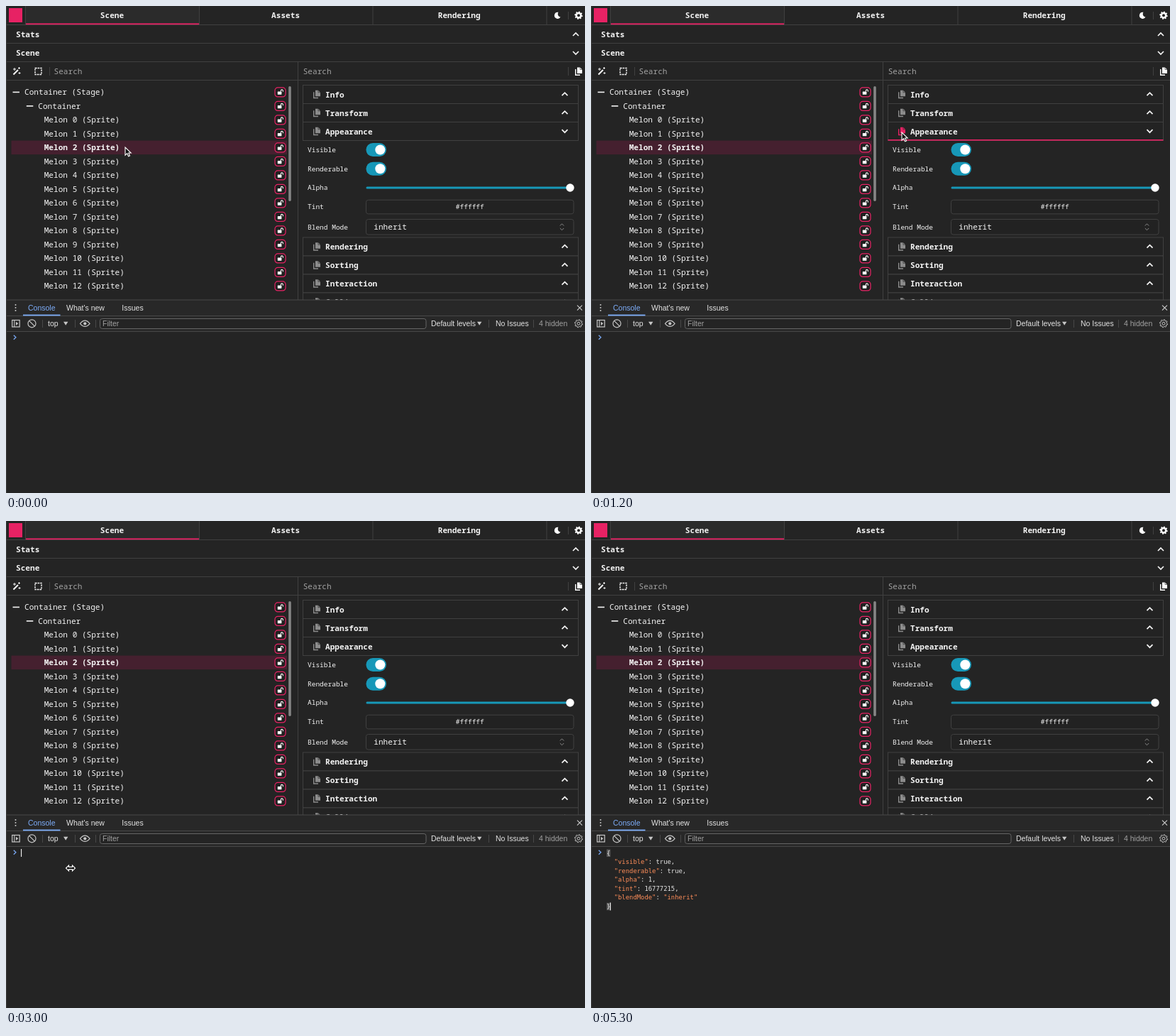
An HTML page that plays this animation: 816 px wide and 686 px high, repeating every 5.4 s.

```html
<!DOCTYPE html>
<html lang="en">
<head>
<meta charset="utf-8">
<title>Scene inspector</title>
<style>
html, body { margin: 0; width: 100%; height: 100%; overflow: hidden; background: #242424; }
svg { display: block; width: 816px; height: 686px; }
text { white-space: pre; fill: #f4f4f4; }
.mono { font: 11.1px "Noto Sans Mono", "DejaVu Sans Mono", monospace; }
.bold { font-weight: 700; }
.small { font-size: 9.5px; }
.ui { font: 10.5px "Liberation Sans", Arial, sans-serif; fill: #e3e3e3; }
.code { font: 8.88px "DejaVu Sans Mono", monospace; fill: #e6e6e6; }
.dim { fill: #a0a0a0; }
.mid { text-anchor: middle; }
</style>
</head>
<body>
<svg id="stage" viewBox="0 0 816 686" xmlns="http://www.w3.org/2000/svg"></svg>
<script>
const PINK = '#e72264', TEAL = '#1798b8', BLUE = '#7cacf8', LINE = '#404040';
const LOOP = 5400, STEP = 100;
const stage = document.getElementById('stage');

const rect = (x, y, w, h, fill, extra = '') =>
  `<rect x="${x}" y="${y}" width="${w}" height="${h}" fill="${fill}" ${extra}/>`;
const path = (d, stroke, width = 1, extra = '') =>
  `<path d="${d}" fill="none" stroke="${stroke}" stroke-width="${width}" ${extra}/>`;
const shape = (d, fill, extra = '') => `<path d="${d}" fill="${fill}" ${extra}/>`;
const dot = (x, y, r, fill, extra = '') => `<circle cx="${x}" cy="${y}" r="${r}" fill="${fill}" ${extra}/>`;
const text = (x, y, s, cls) => `<text x="${x}" y="${y}" class="${cls}">${s}</text>`;
const at = (x, y, body, extra = '') => `<g transform="translate(${x} ${y})" ${extra}>${body}</g>`;
const hLine = (y, x1 = 0, x2 = 816, color = LINE) => rect(x1, y, x2 - x1, 1, color);
const vLine = (x, y1, y2, color = LINE) => rect(x, y1, 1, y2 - y1, color);

const chevron = (x, y, up) =>
  path(up ? 'M-4 2L0 -2L4 2' : 'M-4 -2L0 2L4 -2', '#f4f4f4', 1.7, `transform="translate(${x} ${y})"`);
const copyIcon = (x, y, color, id = '') => at(x, y,
  shape('M-2 -5.5H2L5 -2.5V3H-2Z', color) +
  path('M2 -5.5V-2.5H5', '#242424', .6) +
  path('M-4.3 -3V5.2H2', color, 1.4), id);
const gear = (x, y, r, fill, stroke) => {
  let d = '';
  for (let i = 0; i < 32; i++) {
    const a = (i + .5) / 32 * Math.PI * 2, k = i % 4 < 2 ? r : r * .76;
    d += `${i ? 'L' : 'M'}${(k * Math.cos(a)).toFixed(2)} ${(k * Math.sin(a)).toFixed(2)}`;
  }
  return at(x, y, shape(d + 'Z', fill, `stroke="${stroke}"`) +
    dot(0, 0, r * .34, '#242424', `stroke="${stroke}"`));
};
const lock = y => at(386.5, y,
  rect(-7.5, -6.5, 15, 13, '#202020', `rx="4" stroke="${PINK}" stroke-width="1.2"`) +
  rect(-3.7, -.8, 5.6, 4.2, '#fff', 'rx=".6"') +
  path('M.9 -.8V-2A1.5 1.5 0 0 1 3.9 -2V-.6', '#fff', 1.1));

const rowY = i => 121.4 + 19.5 * i;

function header() {
  return rect(28, 0, 244, 26, '#2b2b2b') +
    [26, 52, 78, 104].map(y => hLine(y)).join('') +
    [27, 272, 516.5, 761.5].map(x => vLine(x, 0, 26)).join('') +
    rect(28, 24.4, 244, 1.8, PINK) +
    rect(4, 3, 19, 20, PINK) +
    ['Scene', 'Assets', 'Rendering'].map((s, i) => text(149.5 + 244.6 * i, 17, s, 'mono bold mid')).join('') +
    vLine(792, 8, 19) +
    shape('M778.5 8.8A4.6 4.6 0 1 0 781.5 15.6A4.3 4.3 0 0 1 778.5 8.8Z', '#fff') +
    gear(807, 13.2, 5.8, '#fff', 'none') +
    text(14, 44.3, 'Stats', 'mono bold') + chevron(803, 40, true) +
    text(14, 70.3, 'Scene', 'mono bold') + chevron(803, 66, false);
}

function toolbars() {
  return path('M10.5 96.5L17 90', '#fff', 2) +
    path('M12 87v4M10 89h4M18.5 86v3M17 87.5h3M19 93v3M17.5 94.5h3', '#fff', .9) +
    rect(41, 87.5, 9, 9, 'none', 'stroke="#fff" stroke-width="1.3" stroke-dasharray="2.6 1"') +
    vLine(61, 86, 98) + text(67.5, 96, 'Search', 'mono dim') +
    vLine(411, 79, 414) +
    text(418.7, 96, 'Search', 'mono dim') + vLine(792, 86, 98) + copyIcon(807, 92, '#fff');
}

function tree() {
  let s = rect(7.5, rowY(4) - 9.8, 388.5, 19.5, '#45202f') +
    rect(7.5, 0, 388.5, 19.5, '#404040', 'id="hover"') +
    rect(9.5, 120.6, 9.5, 1.6, '#f4f4f4') + rect(28.8, 140.1, 9.5, 1.6, '#f4f4f4') +
    text(26, 125.4, 'Container (Stage)', 'mono') + text(45.3, 144.9, 'Container', 'mono');
  for (let i = 0; i < 15; i++) {
    if (i > 1) s += text(53.7, rowY(i) + 4, `Melon ${i - 2} (Sprite)`, i === 4 ? 'mono bold' : 'mono');
    s += lock(rowY(i));
  }
  return s + rect(398.2, 113, 3.6, 162, '#858585', 'rx="1.8"');
}

function section(y, name, id) {
  return rect(418.5, y + .5, 388, 26, '#232323', `stroke="${LINE}"`) +
    copyIcon(438, y + 13.3, '#8c8c8c', id ? `id="${id}"` : '') +
    text(450, y + 17.5, name, 'mono bold') + chevron(787.5, y + 13.2, name !== 'Appearance');
}

function properties() {
  const toggle = y => rect(507.5, y - 9.5, 28.5, 19, TEAL, 'rx="9.5"') + dot(527.3, y, 7, '#fff');
  const box = (y, h) => rect(507.5, y, 292.5, h, '#222', `rx="3" stroke="${LINE}"`);
  return section(111, 'Info') + section(137, 'Transform') + section(163, 'Appearance', 'copy') +
    rect(418.5, 188, 388, 1.6, PINK, 'id="underline"') +
    ['Visible', 'Renderable', 'Alpha', 'Tint', 'Blend Mode']
      .map((s, i) => text(425, [205.7, 232.5, 259.3, 286, 314.5][i], s, 'mono small')).join('') +
    toggle(202.5) + toggle(229.3) +
    rect(507.5, 254.4, 288, 3.2, TEAL, 'rx="1.5"') + dot(795, 256, 5.7, '#fff') +
    box(273.3, 19.5) + text(653.8, 286, '#ffffff', 'mono small mid') +
    box(300.5, 21.5) + text(518.3, 315.2, 'inherit', 'mono') +
    path('M780.8 309.5L783.5 306.8L786.2 309.5M780.8 313L783.5 315.7L786.2 313', '#8c8c8c') +
    ['Rendering', 'Sorting', 'Interaction', 'Culling'].map((s, i) => section(325.5 + 26 * i, s)).join('');
}

function consoleBar() {
  const tri = x => shape(`M${x} 444.7h6.4l-3.2 5Z`, '#c7c7c7');
  return rect(0, 414, 816, 272, '#242424') + rect(0, 414, 816, 44, '#282828') +
    [413.5, 436, 458].map(y => hLine(y, 0, 816, '#484848')).join('') +
    [421, 425, 429].map(y => dot(13.5, y, 1, '#c7c7c7')).join('') +
    text(31, 428.7, 'Console', 'ui" style="fill:' + BLUE) +
    rect(24, 434.6, 52.5, 1.8, BLUE) +
    text(85, 428.7, "What's new", 'ui') + text(163.3, 428.7, 'Issues', 'ui') +
    path('M805 421.7l7 7m0 -7l-7 7', '#c7c7c7', 1.2) +
    rect(8.7, 442.5, 10.5, 9.5, 'none', 'stroke="#c7c7c7" stroke-width="1.2"') +
    path('M11.8 442.5v9.5', '#c7c7c7', 1.1) + shape('M14 444.7l3.2 2.6l-3.2 2.6Z', '#c7c7c7') +
    dot(36.5, 447.3, 5.5, 'none', 'stroke="#c7c7c7" stroke-width="1.2"') +
    path('M32.6 443.4l7.8 7.8', '#c7c7c7', 1.2) +
    [51, 97, 126, 680, 743].map(x => vLine(x, 442, 453, '#484848')).join('') +
    text(59, 451, 'top', 'ui') + tri(81) +
    path('M104.5 447.3Q111.3 439 118.1 447.3Q111.3 455.6 104.5 447.3Z', '#c7c7c7', 1.2) +
    dot(111.3, 447.3, 2.1, '#c7c7c7') +
    rect(132.5, 440.5, 459.5, 14, '#242424', 'rx="3" stroke="#646464"') +
    text(136, 451, 'Filter', 'ui dim') +
    text(599, 451, 'Default levels', 'ui') + tri(664) +
    text(690, 451, 'No Issues', 'ui') + text(751, 451, '4 hidden', 'ui dim') +
    gear(807, 447.3, 5.6, 'none', '#c7c7c7') +
    path('M10.8 463.8L14 466.8L10.8 469.8', BLUE, 1.2);
}

function pasted() {
  const values = { visible: 'true', renderable: 'true', alpha: '1', tint: '16777215', blendMode: '"inherit"' };
  const orange = s => `<tspan fill="#fe8d59">${s}</tspan>`;
  const keys = Object.keys(values);
  const lines = keys.map((k, i) => {
    const v = values[k], comma = i < keys.length - 1 ? ',' : '';
    return text(32.7, 483 + 12.55 * i, `${orange(`"${k}"`)}: ${v[0] === '"' ? orange(v) : v}${comma}`, 'code');
  });
  const brace = (y, s) => rect(22, y - 8, 5.4, 10.5, '#555') + text(22, y, s, 'code');
  return brace(470.5, '{') + lines.join('') + brace(545.8, '}');
}

const arrow = path('M0 0V11.2L2.7 8.7L4.6 12.8L6.5 12L4.7 8H8.2Z', '#fff', 1.1, 'style="fill:#111"');
const resize = shape('M-6.5 0L-2.5 -4V-1.6H2.5V-4L6.5 0L2.5 4V1.6H-2.5V4Z', '#111', 'stroke="#fff" stroke-width="1.1"');

stage.innerHTML = rect(0, 0, 816, 686, '#242424') + header() + toolbars() + tree() + properties() +
  consoleBar() + vLine(0, 0, 686, '#3a3a3a') +
  `<g id="json">${pasted()}</g>` + rect(0, 0, 1.1, 11, '#f4f4f4', 'id="caret"') +
  `<g id="pointer"><g id="arrow">${arrow}</g><g id="resize">${resize}</g></g>`;

const el = Object.fromEntries(['hover', 'copy', 'underline', 'json', 'caret', 'pointer', 'arrow', 'resize']
  .map(id => [id, document.getElementById(id)]));
const show = (node, on) => node.setAttribute('visibility', on ? 'inherit' : 'hidden');

// time, x, y of the pointer
const route = [
  [0, 168, 199], [100, 178, 199], [200, 235, 196], [300, 320, 190], [400, 395, 185], [500, 425, 183],
  [700, 434, 180], [900, 438, 178], [1200, 438, 178], [1500, 424, 192], [1700, 376, 239],
  [1900, 296, 313], [2000, 245, 372], [2200, 112, 526], [2300, 96, 508], [2600, 91, 489],
  [3900, 91, 489], [4200, 110, 503], [4500, 134, 660], [4700, 142, 710], [LOOP, 142, 710]
];

function pointerAt(t) {
  const i = Math.max(1, route.findIndex(p => p[0] >= t));
  const [t0, x0, y0] = route[i - 1], [t1, x1, y1] = route[i];
  const k = Math.max(0, (t - t0) / (t1 - t0));
  return [x0 + (x1 - x0) * k, y0 + (y1 - y0) * k];
}

function render(time) {
  const t = Math.floor((time % LOOP) / STEP) * STEP;
  const [x, y] = pointerAt(t);
  // Hover states trail the pointer by one step.
  const [hx, hy] = pointerAt(Math.max(0, t - STEP));
  const row = Math.round((hy - rowY(0)) / 19.5);
  show(el.hover, hx < 396 && row >= 0 && row < 15 && row !== 4);
  el.hover.setAttribute('y', rowY(row) - 9.8);

  const overHeader = hx < 806 && x > 418 && y > 163 && y < 189;
  show(el.underline, overHeader);
  const overCopy = overHeader && x > 432;
  el.copy.querySelectorAll('path').forEach((p, i) =>
    i === 0 ? p.setAttribute('fill', overCopy ? PINK : '#8c8c8c')
      : i === 2 && p.setAttribute('stroke', overCopy ? PINK : '#8c8c8c'));

  const wide = (t >= 400 && t < 700) || y > 414;
  show(el.arrow, !wide);
  show(el.resize, wide);
  el.pointer.setAttribute('transform', `translate(${x} ${y})`);

  const isPasted = t >= 3500;
  show(el.json, isPasted);
  show(el.caret, (t >= 2700 && t < 3200) || (t >= 3500 && t < 4000) || t >= 4500);
  el.caret.setAttribute('x', isPasted ? 26.8 : 21);
  el.caret.setAttribute('y', isPasted ? 537.5 : 462);
}

const start = performance.now();
function tick() {
  render(performance.now() - start);
  requestAnimationFrame(tick);
}
tick();
</script>
</body>
</html>
```
